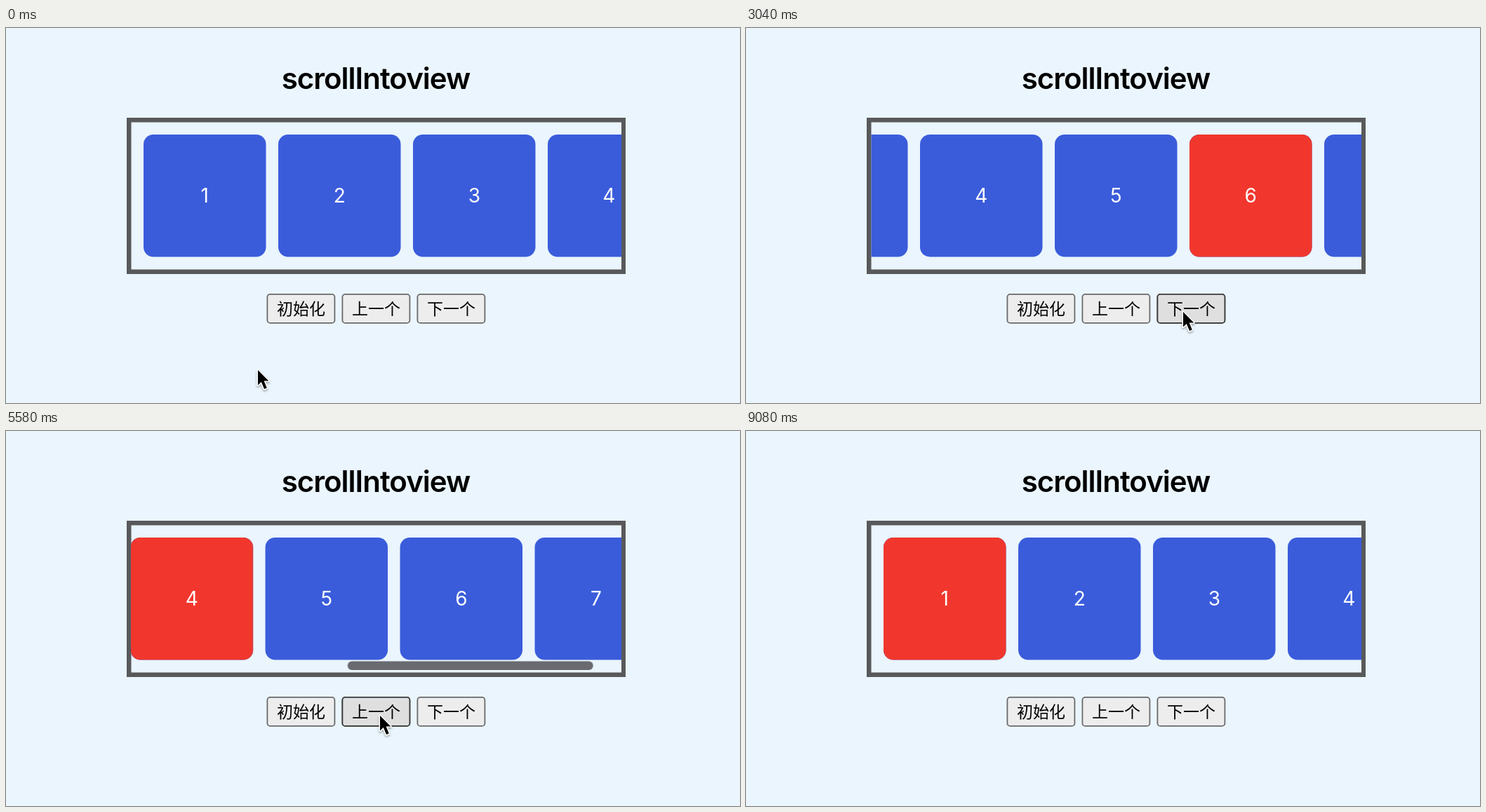
An HTML page that plays this animation: 1046 by 535 pixels, repeating every 9.12 s.

```html
<!DOCTYPE html>
<html lang="zh-CN">
<head>
<meta charset="utf-8">
<title>scrollIntoview</title>
<style>
  @property --scroll { syntax: "<number>"; inherits: true; initial-value: 0; }

  html, body { margin: 0; height: 100%; overflow: hidden; background: #eaf5fd; }
  svg { display: block; width: 100vw; height: 100vh; --loop: 9120ms; animation: scroll var(--loop) infinite ease-in-out; }
  text { text-anchor: middle; }

  .title { font: 600 42px Inter, "Liberation Sans", sans-serif; letter-spacing: -1px; }
  .track { transform: translateX(calc(var(--scroll) * -1px)); }
  .card { fill: #3a5cdb; }
  .active { fill: #f1372d; animation: active var(--loop) infinite step-end; }
  .digit { font: 400 28px Inter, "Liberation Sans", sans-serif; fill: #fff; }
  .thumb { fill: #6a6b70; transform: translateX(calc(var(--scroll) * .5143px)); animation: thumb var(--loop) infinite linear; }
  .button { fill: #ededed; stroke: #6a6a6b; stroke-width: 1.8; }
  .hover { fill: #dfdfe0; stroke: #3a3a3b; animation: hover var(--loop) infinite step-end; }
  .label { font: 400 23px "Noto Sans CJK SC", "Noto Sans CJK", sans-serif; }
  .cursor { animation: cursor var(--loop) infinite linear; }

  @keyframes scroll {
    0%, 10.965% { --scroll: 0; }
    18.224%, 36.952% { --scroll: 524; }
    40.702%, 59.167% { --scroll: 664; }
    62.138%, 66.228% { --scroll: 576; }
    70.614%, 72.149% { --scroll: 384; }
    76.535%, 81.469% { --scroll: 192; }
    85.855%, 100% { --scroll: 0; }
  }
  @keyframes active {
    0% { transform: translateX(-600px); }
    10.965% { transform: translateX(768px); }
    29.605% { transform: translateX(960px); }
    36.952% { transform: translateX(1152px); }
    49.123% { transform: translateX(960px); }
    53.728% { transform: translateX(768px); }
    59.167% { transform: translateX(576px); }
    66.228% { transform: translateX(384px); }
    72.149% { transform: translateX(192px); }
    81.469%, 100% { transform: translateX(0); }
  }
  @keyframes thumb {
    0%, 10.96% { opacity: 0; }
    11%, 23.7% { opacity: 1; }
    26.3%, 36.94% { opacity: 0; }
    37%, 46.16% { opacity: 1; }
    48.8%, 59.15% { opacity: 0; }
    59.2%, 91.34% { opacity: 1; }
    93.97%, 100% { opacity: 0; }
  }
  @keyframes hover {
    0% { transform: translateX(-600px); }
    9.32% { transform: translateX(0); }
    22.48% { transform: translateX(-600px); }
    22.7% { transform: translateX(107px); }
    24.56% { transform: translateX(-600px); }
    24.8% { transform: translateX(214px); }
    44% { transform: translateX(-600px); }
    44.4% { transform: translateX(107px); }
    89.9% { transform: translateX(-600px); }
    90.2% { transform: translateX(214px); }
    92%, 100% { transform: translateX(-600px); }
  }
  @keyframes cursor {
    0% { transform: translate(358px, 487px); animation-timing-function: ease-in; }
    4.93% { transform: translate(420px, 462px); }
    9.32% { transform: translate(432px, 420px); animation-timing-function: ease-out; }
    10.96%, 20.83% { transform: translate(432px, 408px); animation-timing-function: ease-in-out; }
    26.32%, 42.76% { transform: translate(622px, 404px); animation-timing-function: ease-in; }
    43.86% { transform: translate(590px, 402px); animation-timing-function: ease-out; }
    46.6%, 87.72% { transform: translate(532px, 405px); animation-timing-function: ease-in; }
    92.65% { transform: translate(700px, 425px); }
    95.39% { transform: translate(820px, 455px); }
    97.04% { transform: translate(876px, 462px); }
    98.9% { transform: translate(948px, 455px); animation-timing-function: step-end; }
    99.1%, 100% { transform: translate(1100px, 440px); }
  }
</style>
</head>
<body>
<svg viewBox="0 0 1046 535">
  <defs>
    <clipPath id="view"><rect x="178.5" y="134.5" width="698.5" height="210"/></clipPath>
    <filter id="soft" x="-50%" y="-50%" width="200%" height="200%">
      <feDropShadow dx="0" dy="2" stdDeviation="1.5" flood-opacity=".35"/>
    </filter>
    <rect id="tile" x="196" y="152" width="174.5" height="174.5" rx="14"/>
    <rect id="key" x="372.4" y="379.9" width="96" height="41" rx="4"/>
  </defs>

  <text class="title" x="527" y="87">scrollIntoview</text>

  <path fill="#58595b" fill-rule="evenodd" d="M172 128h711v223h-711zM178.5 134.5v210h698.5v-210z"/>
  <g clip-path="url(#view)">
    <g class="track">
      <g id="cards"></g>
      <use class="active" href="#tile"/>
      <g id="digits"></g>
    </g>
    <rect class="thumb" x="181" y="328.5" width="350" height="12.5" rx="6.25"/>
  </g>

  <g id="buttons"></g>
  <use class="button hover" href="#key"/>
  <g id="labels"></g>

  <g class="cursor">
    <path filter="url(#soft)" stroke="#fff" stroke-width="3" paint-order="stroke" stroke-linejoin="round"
      d="M1 1V22.5L5.8 18L10 28L13.8 26.4L9.6 16.6H16.3Z"/>
  </g>
</svg>
<script>
  const add = (id, markup) => document.getElementById(id).insertAdjacentHTML("beforeend", markup);

  for (let i = 0; i < 7; i++) {
    const x = i * 192;
    add("cards", `<use class="card" href="#tile" x="${x}"/>`);
    add("digits", `<text class="digit" x="${283.3 + x}" y="249.3">${i + 1}</text>`);
  }

  ["初始化", "上一个", "下一个"].forEach((label, i) => {
    const x = i * 107;
    add("buttons", `<use class="button" href="#key" x="${x}"/>`);
    add("labels", `<text class="label" x="${420.4 + x}" y="409">${label}</text>`);
  });
</script>
</body>
</html>
```
